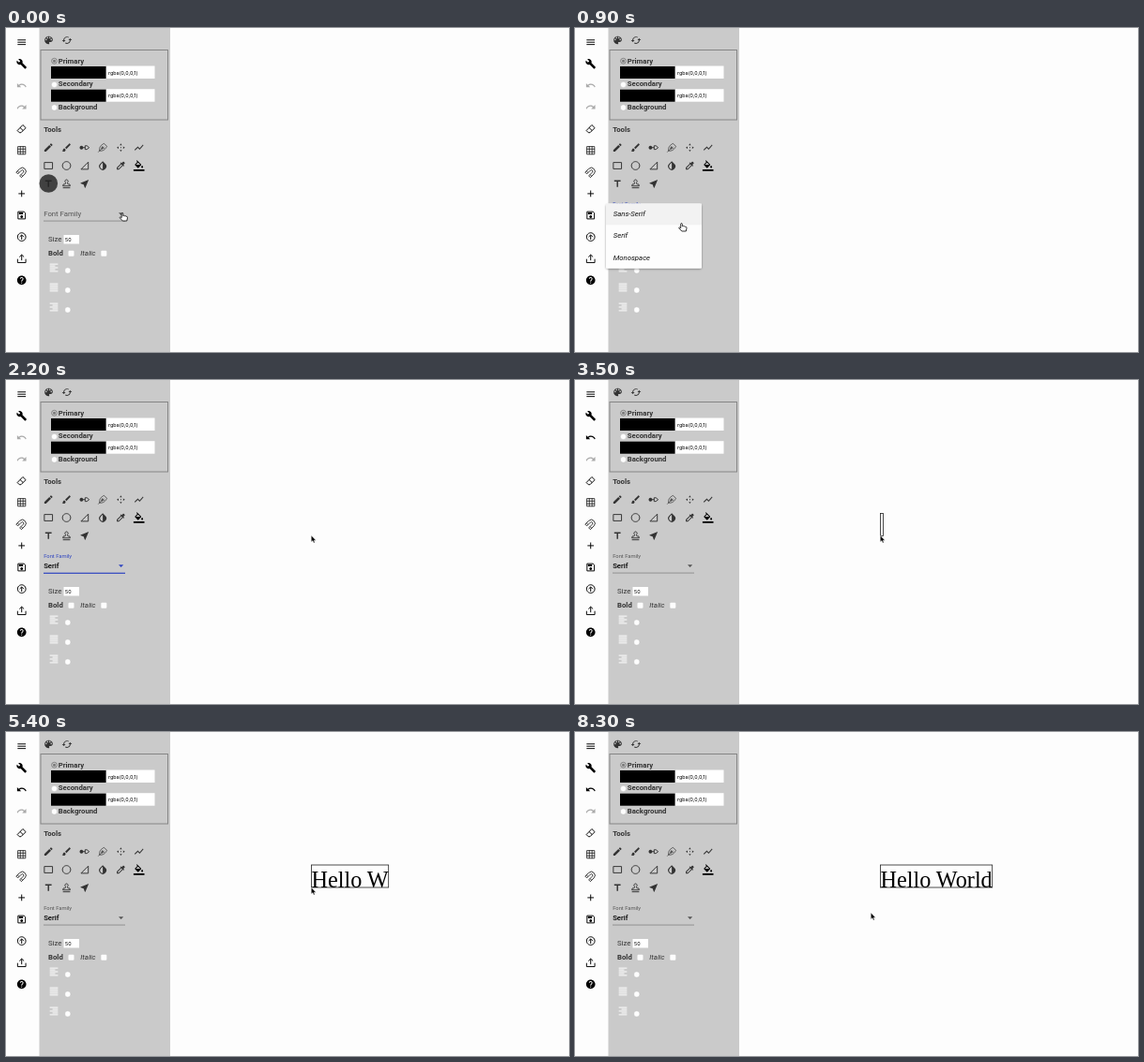
Recreate the animation shown at these times as an HTML page. Size 600 px wide and 346 px high, loop 8400 ms.

```html
<!DOCTYPE html>
<html lang="en">
<head>
<meta charset="utf-8">
<title>Text tool demo</title>
<style>
  html, body { margin: 0; width: 100%; height: 100%; overflow: hidden; background: #fdfdfd; }
  svg { display: block; width: 100%; height: 100%; }
  text { font: 7.75px Roboto, sans-serif; fill: #333; white-space: pre; }
  .bold { font-weight: 700; }
  .italic { font-style: italic; }
  .value { font: 5.4px Inter, sans-serif; fill: #000; }
  .typed { font: 24.2px "Liberation Serif", serif; fill: #000; }
  .line { fill: none; stroke: currentColor; stroke-width: 2; }
  .thin { stroke-width: 1.5; }
</style>
</head>
<body>
<svg id="stage" viewBox="0 0 600 346"></svg>
<script>
const stage = document.getElementById('stage');
const BLUE = '#2f45c0';

// Icons are drawn on a 24 x 24 grid.
const fill = d => `<path fill="currentColor" fill-rule="evenodd" d="${d}"/>`;
const line = (d, cls = '') => `<path class="line ${cls}" d="${d}"/>`;
const undo = fill('M12.5 8c-2.65 0-5.05.99-6.9 2.6L2 7v9h9l-3.62-3.62c1.39-1.16 3.16-1.88 5.12-1.88 3.54 0 6.55 2.31 7.6 5.5l2.37-.78C21.08 11.03 17.15 8 12.5 8z');
const icons = {
  menu: line('M3 7h18M3 12h18M3 17h18'),
  wrench: fill('M22.7 19l-9.1-9.1c.9-2.3.4-5-1.5-6.9-2-2-5-2.4-7.4-1.3L9 6 6 9 1.6 4.7C.4 7.1.9 10.1 2.9 12.1c1.9 1.9 4.6 2.4 6.9 1.5l9.1 9.1c.4.4 1 .4 1.4 0l2.3-2.3c.5-.4.5-1.1.1-1.4z'),
  undo,
  redo: `<g transform="matrix(-1 0 0 1 24 0)">${undo}</g>`,
  eraser: line('M14.5 3.5l6.5 6.5L10.5 20.5H7L2.5 16zM8.5 9.5l6.5 6.5'),
  grid: line('M3.5 3.5h17v17h-17zM9 3v18M15 3v18M3 9h18M3 15h18', 'thin'),
  magnet: `<g transform="rotate(45 12 12)">${line('M4 21V10a8 8 0 0 1 16 0v11h-5V10a3 3 0 0 0-6 0v11zM4 17h5M15 17h5', 'thin')}</g>`,
  plus: line('M12 5v14M5 12h14'),
  save: line('M4 4h13l3 3v13H4z') + fill('M6 6h9v4H6zM12 12a3 3 0 1 0 .01 0z'),
  upload: line('M12 3a9 9 0 1 0 .01 0zM12 18V8M7.5 12l4.5-4.5 4.5 4.5'),
  share: line('M3 13v8h18v-8M12 16V4M7 8.5l5-5 5 5'),
  help: fill('M12 2C6.48 2 2 6.48 2 12s4.48 10 10 10 10-4.48 10-10S17.52 2 12 2zm1 17h-2v-2h2v2zm2.07-7.75l-.9.92C13.45 12.9 13 13.5 13 15h-2v-.5c0-1.1.45-2.1 1.17-2.83l1.24-1.26c.37-.36.59-.86.59-1.41 0-1.1-.9-2-2-2s-2 .9-2 2H8c0-2.21 1.79-4 4-4s4 1.79 4 4c0 .88-.36 1.68-.93 2.25z'),
  palette: fill('M12 3a9 9 0 0 0 0 18c.83 0 1.5-.67 1.5-1.5 0-.39-.15-.74-.39-1.01-.23-.26-.38-.61-.38-.99 0-.83.67-1.5 1.5-1.5H16c2.76 0 5-2.24 5-5 0-4.42-4.03-8-9-8zM6.5 9a1.5 1.5 0 1 0 .01 0zM9.5 5a1.5 1.5 0 1 0 .01 0zM14.5 5a1.5 1.5 0 1 0 .01 0zM17.5 9a1.5 1.5 0 1 0 .01 0z'),
  sync: fill('M19 8l-4 4h3c0 3.31-2.69 6-6 6-1.01 0-1.97-.25-2.8-.7l-1.46 1.46C8.97 19.54 10.43 20 12 20c4.42 0 8-3.58 8-8h3zM6 12c0-3.31 2.69-6 6-6 1.01 0 1.97.25 2.8.7l1.46-1.46C15.03 4.46 13.57 4 12 4c-4.42 0-8 3.58-8 8H1l4 4 4-4z'),
  pencil: fill('M3 17.25V21h3.75L17.81 9.94l-3.75-3.75zM20.71 7.04c.39-.39.39-1.02 0-1.41l-2.34-2.34c-.39-.39-1.02-.39-1.41 0l-1.83 1.83 3.75 3.75z'),
  brush: fill('M7 14c-1.66 0-3 1.34-3 3 0 1.31-1.16 2-2 2 .92 1.22 2.49 2 4 2 2.21 0 4-1.79 4-4 0-1.66-1.34-3-3-3zm13.71-9.37l-1.34-1.34c-.39-.39-1.02-.39-1.41 0L9 12.25 11.75 15l8.96-8.96c.39-.39.39-1.02 0-1.41z'),
  nodes: fill('M5 8a4 4 0 1 0 .01 0z') + line('M8 12h5M13 8h4l5 4-5 4h-4z'),
  nib: line('M2 22L14 10M5 19c-1-8 3-13 10-16l6 6c-3 7-8 11-16 10M8 13h8M11 9v7', 'thin'),
  spread: fill('M12 3l2.5 4h-5zM12 21l2.5-4h-5zM3 12l4-2.5v5zM21 12l-4-2.5v5zM11 11h2v2h-2z'),
  chart: fill('M3.5 18.49l6-6.01 4 4L22 6.92l-1.41-1.41-7.09 7.97-4-4L2 16.99z'),
  rect: line('M3 5h18v14H3z'),
  circle: line('M12 3a9 9 0 1 0 .01 0z'),
  triangle: line('M20 4v16H4z'),
  drop: fill('M17.66 7.93L12 2.27 6.34 7.93a8 8 0 0 0 0 11.31 8 8 0 0 0 11.32 0 8 8 0 0 0 0-11.31zM12 19.59a6 6 0 0 1-4.24-10.24L12 5.1z'),
  picker: fill('M20.71 5.63l-2.34-2.34c-.39-.39-1.02-.39-1.41 0l-3.12 3.12-1.93-1.91-1.41 1.41 1.42 1.42L3 16.25V21h4.75l8.92-8.92 1.42 1.42 1.41-1.41-1.92-1.92 3.12-3.12c.4-.4.4-1.03.01-1.42zM6.92 19L5 17.08l8.06-8.06 1.92 1.92z'),
  bucket: fill('M16.56 8.94L7.62 0 6.21 1.41l2.38 2.38-5.15 5.15c-.59.59-.59 1.54 0 2.12l5.5 5.5c.59.59 1.54.59 2.12 0l5.5-5.5c.59-.58.59-1.53 0-2.12zM5.21 10L10 5.21 14.79 10zM19 11.5s-2 2.17-2 3.5a2 2 0 0 0 4 0c0-1.33-2-3.5-2-3.5zM0 20h24v4H0z'),
  type: fill('M5 4v3h5.5v12h3V7H19V4z'),
  stamp: line('M12 3a3.5 3.5 0 0 0-3 5c2 4 1 5-2 5a3 3 0 0 0-3 3v1h16v-1a3 3 0 0 0-3-3c-3 0-4-1-2-5a3.5 3.5 0 0 0-3-5zM4 21h16'),
  pointer: fill('M21 3L3 10.53v.98l6.84 2.65L12.48 21h.98z'),
  left: line('M3 4h18M3 8h12M3 12h18M3 16h12M3 20h18'),
  justify: line('M3 4h18M3 8h18M3 12h18M3 16h18M3 20h18'),
  right: line('M3 4h18M9 8h12M3 12h18M9 16h12M3 20h18')
};

const icon = (name, x, y, color = '#333') =>
  `<g id="icon-${name}" color="${color}" transform="translate(${x - 5.8} ${y - 5.8}) scale(.484)">${icons[name]}</g>`;
const box = (x, y, w, h, color, extra = '') =>
  `<rect x="${x}" y="${y}" width="${w}" height="${h}" fill="${color}" ${extra}/>`;
const text = (x, y, str, cls = '', extra = '') => `<text x="${x}" y="${y}" class="${cls}" ${extra}>${str}</text>`;
const dot = (x, y) => `<circle cx="${x}" cy="${y}" r="3.2" fill="#fdfdfd" stroke="#aaa" stroke-width=".4"/>`;

const sidebar = ['menu', 'wrench', 'undo', 'redo', 'eraser', 'grid', 'magnet', 'plus', 'save', 'upload', 'share', 'help']
  .map((name, i) => icon(name, 16.7, 15.2 + i * 23.1, name === 'redo' ? '#aaa' : '#000')).join('');

const tools = [
  ['pencil', 'brush', 'nodes', 'nib', 'spread', 'chart'],
  ['rect', 'circle', 'triangle', 'drop', 'picker', 'bucket'],
  ['type', 'stamp', 'pointer']
].map((row, r) => row.map((name, c) =>
  icon(name, 45.2 + c * 19.3, 127.7 + r * 19.3, name === 'bucket' ? '#000' : undefined)).join('')).join('');

const swatch = y => box(48, y, 58.5, 13, '#000') + box(107, y - .5, 51.5, 13.5, '#fff') + text(109, y + 8.6, 'rgba(0,0,0,1)', 'value');

const menuItems = ['Sans-Serif', 'Serif', 'Monospace'].map((name, i) =>
  box(33, 187.5 + i * 23, 102, 23, '#fdfdfd', `id="item${i}"`) +
  text(40.7, 201.3 + i * 23.1, name, 'italic', `id="name${i}" style="fill:#111"`)).join('');

stage.innerHTML = `
  <filter id="shadow" x="-10%" y="-10%" width="120%" height="125%"><feDropShadow dx="0" dy="1" stdDeviation="1.3" flood-opacity=".4"/></filter>
  ${box(0, 0, 600, 346, '#fdfdfd')}
  ${box(35.5, 0, 139.5, 346, '#cacaca')}
  ${sidebar}
  ${icon('palette', 45.5, 13)}${icon('sync', 65, 13)}
  ${box(37, 23.5, 135.5, 74.5, 'none', 'stroke="#858585"')}
  <circle cx="51.5" cy="35.2" r="2.9" fill="#ccc" stroke="#666" stroke-width=".7"/><circle cx="51.5" cy="35.2" r="1.5" fill="#777"/>
  ${dot(51.5, 60.5)}${dot(51.5, 85)}
  ${text(55.7, 37.9, 'Primary', 'bold')}${text(55.7, 62.4, 'Secondary', 'bold')}${text(55.7, 87, 'Background', 'bold')}
  ${swatch(41)}${swatch(65.7)}
  ${text(40.2, 110.8, 'Tools', 'bold')}
  ${tools}
  <circle id="ripple" cx="45.3" cy="166" r="9.8" fill="#222"/>
  ${text(0, 0, 'Font Family', '', 'id="label"')}
  ${text(40.2, 201.2, 'Serif', '', 'id="chosen" style="fill:#000;font-weight:500"')}
  <path id="caret" d="M120 197.3h5.2l-2.6 2.6z"/>
  ${box(40, 205.7, 87, 1, '#777', 'id="underline"')}
  ${text(45, 228.4, 'Size')}${box(61.5, 221, 16.5, 9.5, '#fff')}${text(63, 228.1, '50', 'value')}
  ${text(45, 242.8, 'Bold', 'bold')}${text(79.3, 242.8, 'Italic', 'italic')}
  ${box(66.5, 237.7, 6, 6, '#fdfdfd', 'rx="1"')}${box(101.3, 237.7, 6, 6, '#fdfdfd', 'rx="1"')}
  ${['left', 'justify', 'right'].map((n, i) => icon(n, 51, 256 + i * 21, '#fff') + dot(65.8, 259 + i * 21)).join('')}
  <g id="menu"><g filter="url(#shadow)">${box(33, 187.5, 102, 69, '#fdfdfd', 'rx="2"')}</g>${menuItems}</g>
  ${box(325.5, 142.5, 3, 24, 'none', 'id="frame" stroke="#222" stroke-width=".8"')}
  ${text(325.5, 166, '', 'typed', 'id="typed"')}
  <g id="cursor" stroke-linejoin="round">
    <path id="arrow" fill="#000" stroke="#fff" stroke-width=".4" d="M0 0V7L1.6 5.6 2.7 8 3.9 7.5 2.8 5.2H5z"/>
    <path id="hand" fill="#fff" stroke="#000" stroke-width=".8" d="M-.8.8C-.8-.2.8-.2.8.8V3.2C1.5 2.6 2.3 2.8 2.6 3.4 3.3 3 4 3.2 4.2 3.9 5 3.7 5.6 4.2 5.5 5L4.8 8.5H.4L-2.6 5.4C-3.2 4.6-2.1 4-1.5 4.6L-.8 5.2z"/>
  </g>`;

const $ = id => document.getElementById(id);
const set = (id, attrs) => Object.entries(attrs).forEach(([key, value]) => $(id).setAttribute(key, value));
const progress = (t, from, to) => Math.min(1, Math.max(0, (t - from) / (to - from)));
const mix = (a, b, k) => a + (b - a) * k;

const cursorPath = [[0, 124, 197.5], [500, 124, 197.5], [900, 113.5, 208.5], [1300, 107, 219],
  [1800, 107, 219], [2200, 325.3, 166], [8100, 325.3, 166], [8300, 315.3, 193]];
const keyTimes = [3700, 4000, 4200, 4300, 4500, 4900, 5400, 5600, 5800, 6000, 6200];

function cursorAt(t) {
  const next = cursorPath.findIndex(([time]) => time > t);
  if (next < 0) return cursorPath.at(-1).slice(1);
  const [from, x0, y0] = cursorPath[next - 1], [to, x1, y1] = cursorPath[next];
  const k = progress(t, from, to);
  return [mix(x0, x1, k), mix(y0, y1, k)];
}

function render(t) {
  const clicked = t >= 2700;
  const focused = t >= 300 && !clicked;
  const accent = focused ? BLUE : '#555';
  const lift = progress(t, 200, 500);

  set('ripple', { opacity: .82 * (1 - progress(t, 0, 400)) });
  set('icon-undo', { color: clicked ? '#000' : '#aaa' });
  set('label', {
    transform: `translate(40.2 ${mix(201.2, 189.6, lift)}) scale(${mix(1, .75, lift)})`,
    style: `fill:${accent}`
  });
  set('caret', { fill: accent });
  set('underline', { fill: focused ? BLUE : '#777', height: focused ? 1.2 : .7 });
  set('chosen', { visibility: t >= 1400 ? 'visible' : 'hidden' });

  const open = progress(t, 200, 400);
  const shown = t < 1400 ? open : t < 1500 ? 1 : t < 1600 ? .4 : 0;
  set('menu', { opacity: shown, transform: `translate(0 ${187.5 * (1 - mix(.8, 1, open))}) scale(1 ${mix(.8, 1, open)})` });
  set('item0', { fill: t < 1400 ? '#f2f2f2' : '#e6e6e6' });
  set('item1', { fill: t < 1100 ? '#fdfdfd' : t < 1300 ? '#f2f2f2' : '#b6b6b6' });
  set('name1', { style: `fill:${t >= 1400 ? BLUE : '#111'}` });

  const typed = 'Hello World'.slice(0, keyTimes.filter(time => time <= t).length);
  $('typed').textContent = typed.trimEnd();
  set('frame', {
    visibility: t >= 3500 ? 'visible' : 'hidden',
    y: t >= 4900 ? 142 : 142.5,
    width: typed ? $('typed').getComputedTextLength() : 3
  });

  const pointing = t < 1400;
  set('cursor', { transform: `translate(${cursorAt(t)})` });
  set('hand', { visibility: pointing ? 'visible' : 'hidden' });
  set('arrow', { visibility: pointing ? 'hidden' : 'visible' });
}

function tick() {
  render(Math.floor(performance.now() % 8400 / 100) * 100);
  requestAnimationFrame(tick);
}
tick();
</script>
</body>
</html>
```
